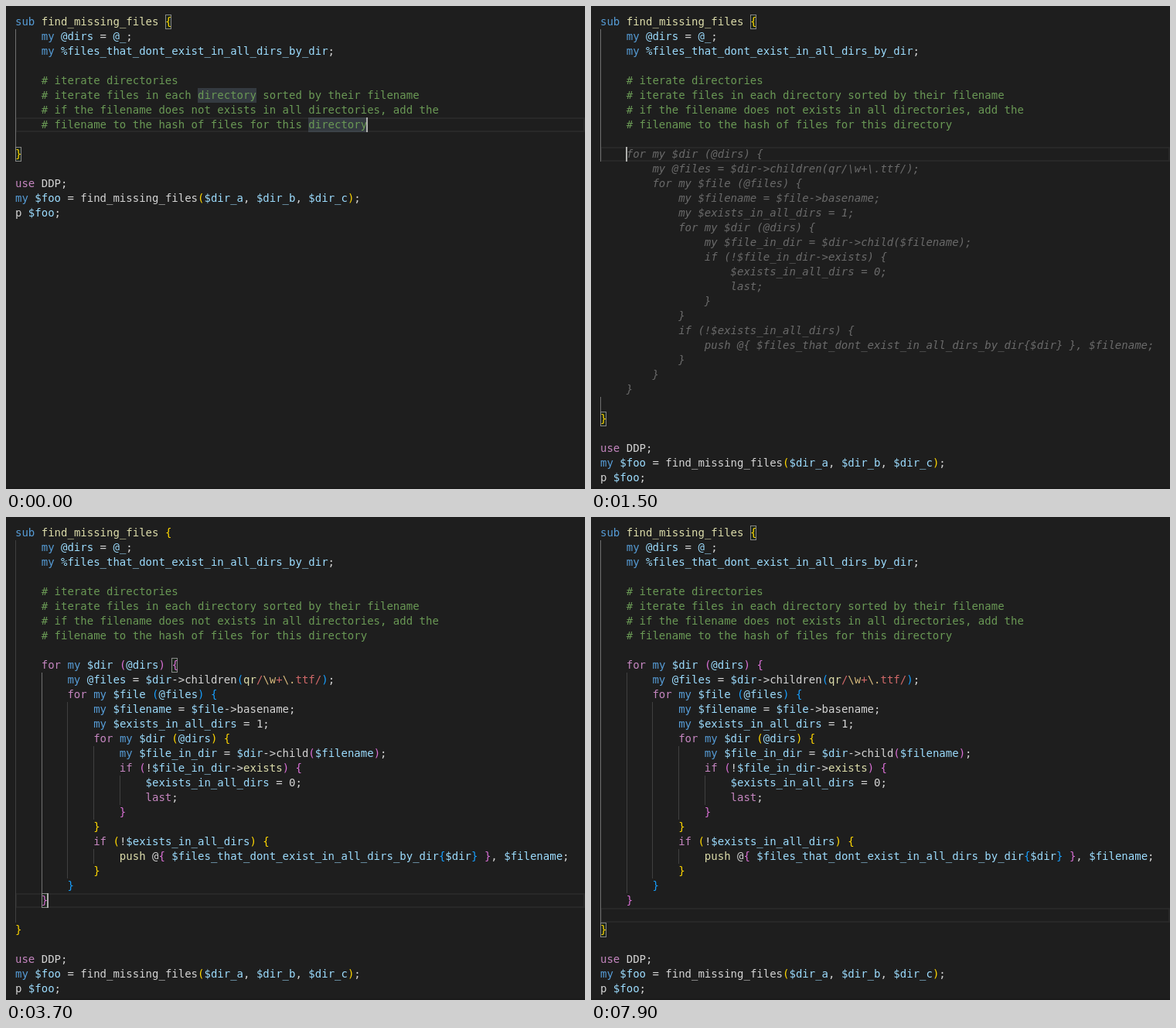
Animation of 749x624 px, one loop 8 s. Source, as an HTML page:

```html
<!DOCTYPE html>
<html>
<head>
<meta charset="utf-8">
<style>
  html, body { margin: 0; width: 100%; height: 100%; overflow: hidden; background: #1e1e1e; }
  #stage { position: relative; width: 749px; height: 624px; overflow: hidden; border-bottom: 0; }
  #stage::after { content: ""; position: absolute; left: 0; right: 0; bottom: 0; height: 2px; background: #1a1a1a; }
  pre, i { position: absolute; }
  pre { margin: 0; left: 12px; top: 11px; color: #d4d4d4; font: 14px/19px "DejaVu Sans Mono", monospace; }
  i { height: 19px; box-sizing: border-box; }
  .line { border: 2px solid #282828; }
  .word { background: #add6ff26; }
  .match { border: 1px solid #888; background: rgba(0, 100, 0, .1); }
  .guide { background: #404040; }
  .active { background: #707070; }
  .cursor { background: #aeafad; }
  .ghost { color: #ffffff56; font-style: italic; }
  .comment { color: #6a9955; }
  .control { color: #c586c0; }
  .storage { color: #569cd6; }
  .name { color: #9cdcfe; }
  .func { color: #dcdcaa; }
  .regex { color: #d16969; }
  .escape { color: #d7ba7d; }
  .b0 { color: #ffd700; }
  .b1 { color: #da70d6; }
  .b2 { color: #179fff; }
</style>
</head>
<body>
<div id="stage"></div>
<script>
const HEAD = String.raw`sub find_missing_files {
    my @dirs = @_;
    my %files_that_dont_exist_in_all_dirs_by_dir;

    # iterate directories
    # iterate files in each directory sorted by their filename
    # if the filename does not exists in all directories, add the
    # filename to the hash of files for this directory`.split('\n');

const LOOP = String.raw`    for my $dir (@dirs) {
        my @files = $dir->children(qr/\w+\.ttf/);
        for my $file (@files) {
            my $filename = $file->basename;
            my $exists_in_all_dirs = 1;
            for my $dir (@dirs) {
                my $file_in_dir = $dir->child($filename);
                if (!$file_in_dir->exists) {
                    $exists_in_all_dirs = 0;
                    last;
                }
            }
            if (!$exists_in_all_dirs) {
                push @{ $files_that_dont_exist_in_all_dirs_by_dir{$dir} }, $filename;
            }
        }
    }`.split('\n');

const TAIL = String.raw`
}

use DDP;
my $foo = find_missing_files($dir_a, $dir_b, $dir_c);
p $foo;`.split('\n');

const DURATION = 8000, CHAR = 8.4287, ROW = 19, LEFT = 12, TOP = 11;
const SUGGEST = 1500, ACCEPT = 3600;
// time, row, column
const CURSOR = [[0, 7, 54], [800, 8, 4], [1300, 9, 4], [ACCEPT, 25, 5], [4700, 26, 0], [6400, 26, 4]];
const BLINKS = [500, 800, 1700, 2400, 2900, 3300, 4100, 4700, 5100, 5600, 6100, 6400, 7000, 7400, 7900];
const CHANGES = [...new Set([0, SUGGEST, 3700, 4800, ...BLINKS, ...CURSOR.map(c => c[0])])].sort((a, b) => a - b);

const TOKENS = /(?<comment>#.*)|(?<control>\b(for|if|last|use)\b)|(?<storage>\b(my|sub)\b)|(?<name>[$@%]\w+)|(?<func>(?<=sub )\w+|\b(push|exists|qr)\b)|(?<regex>\/.*\/)|(?<open>[{(])|(?<close>[})])/g;

const span = (cls, text) => `<span class="${cls}">${text}</span>`;
const colX = col => Math.round(LEFT + col * CHAR);
const box = (cls, row, x, width) =>
  `<i class="${cls}" style="left:${x}px;top:${TOP + row * ROW}px;width:${width}px"></i>`;

function highlight(lines) {
  let depth = 0;
  return lines.map(line => line.replace(TOKENS, (text, ...args) => {
    const groups = args.at(-1);
    const kind = Object.keys(groups).find(key => groups[key] !== undefined);
    if (kind === 'open') return span('b' + depth++ % 3, text);
    if (kind === 'close') return span('b' + --depth % 3, text);
    if (kind === 'regex') text = text.replace(/\\./g, m => span('escape', m));
    return span(kind, text);
  }));
}

function render(t) {
  const [, row, col] = CURSOR.findLast(c => c[0] <= t);
  const accepted = t >= ACCEPT, ghost = t >= SUGGEST && !accepted;
  const blanks = t < 800 ? 0 : t < 1300 ? 1 : 2;
  const body = t >= SUGGEST ? ['', ...LOOP] : Array(blanks).fill('');
  const lines = [...HEAD, ...body, ...TAIL];
  const end = lines.indexOf('}');
  const isGhost = i => ghost && i >= 9 && i < 9 + LOOP.length;

  let html = box('line', row, LEFT, 749 - LEFT);
  if (t < 800) html += box('word', 5, colX(28), 76) + box('word', 7, colX(45), 76);

  const activeCol = accepted && t < 4700 ? 4 : 0;
  for (let i = 1; i < end; i++) {
    if (isGhost(i) && i > 9) continue;
    const indent = isGhost(i) ? 4 : lines[i].search(/\S/);
    for (let c = 0; c < Math.max(indent, 1); c += 4)
      html += box(c === activeCol ? 'active' : 'guide', i, colX(c), 1);
  }

  const inner = t >= 3700 && t < 4800;
  for (const [r, c] of inner ? [[9, 24], [25, 4]] : [[0, 23], [end, 0]])
    html += box('match', r, colX(c), 8);

  const colored = highlight(lines.map((line, i) => isGhost(i) ? '' : line));
  html += `<pre>${colored.map((line, i) => isGhost(i) ? span('ghost', lines[i]) : line).join('\n')}</pre>`;

  if (BLINKS.filter(b => b <= t).length % 2 === 0)
    html += box('cursor', row, Math.max(LEFT, colX(col) - 1), 2);
  document.getElementById('stage').innerHTML = html;
}

let shown = -1;
function tick() {
  const now = performance.now() % DURATION;
  const state = CHANGES.findLast(c => c <= now);
  if (state !== shown) render(shown = state);
  requestAnimationFrame(tick);
}
tick();
</script>
</body>
</html>
```
